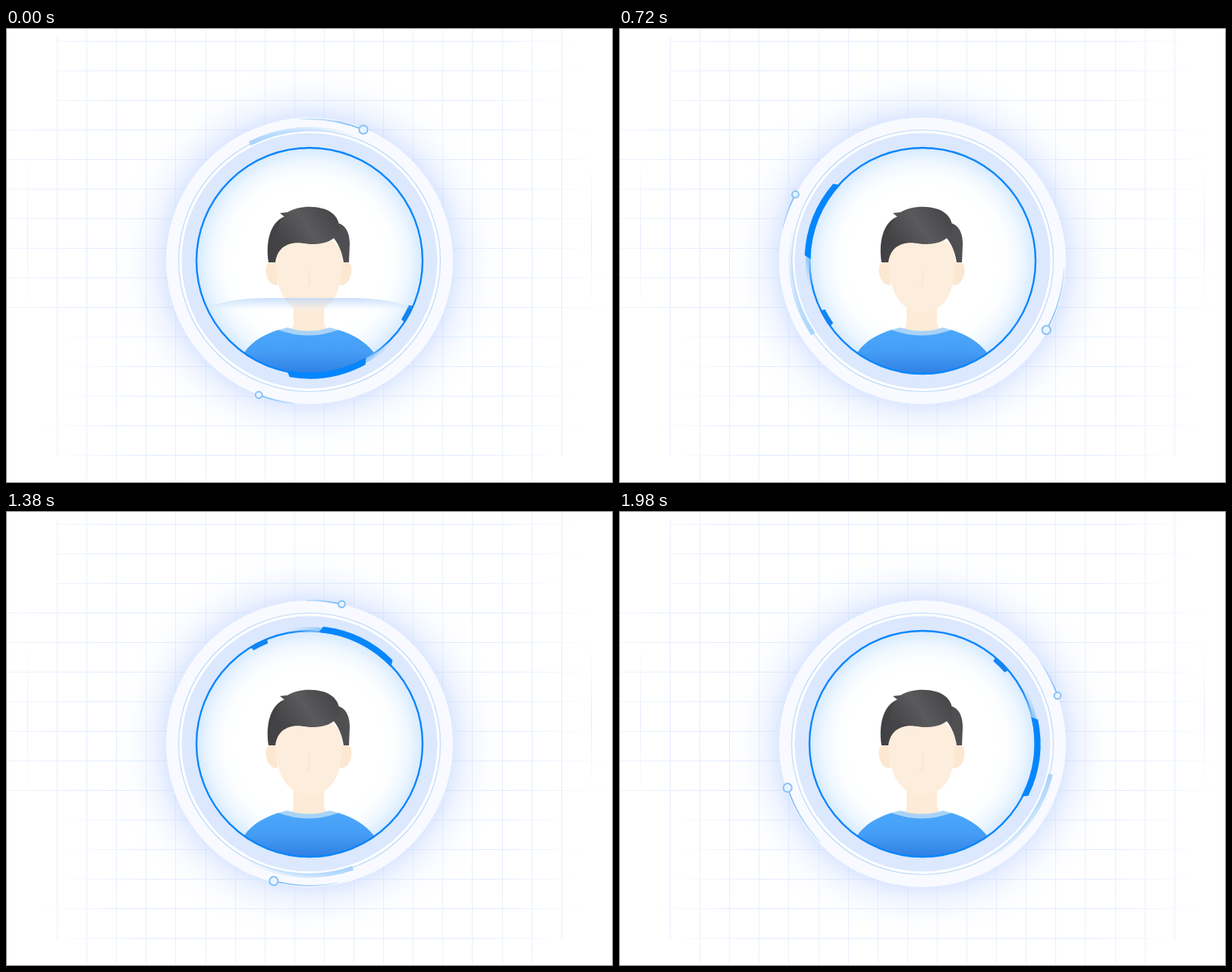
An HTML page with a canvas for the animation above (2040 ms loop, 800 by 600 pixels).

```html
<!DOCTYPE html>
<html lang="en">
<head>
<meta charset="utf-8">
<title>Face scan</title>
<style>
html, body { margin: 0; width: 100%; height: 100%; overflow: hidden; background: #fff }
canvas { display: block }
</style>
</head>
<body>
<canvas id="stage" width="800" height="600"></canvas>
<script>
const ctx = document.getElementById('stage').getContext('2d');
const CX = 400, CY = 307, LOOP = 2040, STEP = 60;
const rad = deg => deg * Math.PI / 180;
const clamp = v => Math.max(0, Math.min(1, v));

function fade(make, ...colors) {
  colors.forEach((c, i) => make.addColorStop(i / (colors.length - 1), c));
  return make;
}

const linear = (x0, y0, x1, y1, ...colors) => fade(ctx.createLinearGradient(x0, y0, x1, y1), ...colors);

const radial = (r0, r1, ...colors) => fade(ctx.createRadialGradient(CX, CY, r0, CX, CY, r1), ...colors);

// Gradient running along the angle from a0 to a1
function sweep(a0, a1, from, to) {
  const g = ctx.createConicGradient(rad(a0), CX, CY);
  g.addColorStop(0, from);
  g.addColorStop((a1 - a0) / 360, to);
  return g;
}

function disc(r, fill, x = CX, y = CY) {
  ctx.beginPath();
  ctx.arc(x, y, r, 0, 7);
  ctx.fillStyle = fill;
  ctx.fill();
}

function arc(r, width, color, a0 = 0, a1 = 360) {
  ctx.beginPath();
  ctx.arc(CX, CY, r, rad(a0), rad(a1));
  ctx.lineWidth = width;
  ctx.strokeStyle = color;
  ctx.stroke();
}

// Ring segment whose outer edge is shorter than the inner one by slant at each end
function wedge(r0, r1, a0, a1, slant, fill) {
  ctx.beginPath();
  ctx.arc(CX, CY, r1, rad(a0 + slant), rad(a1 - slant));
  ctx.arc(CX, CY, r0, rad(a1), rad(a0), true);
  ctx.fillStyle = fill;
  ctx.fill();
}

function shape(d, fill) {
  ctx.fillStyle = fill;
  ctx.fill(new Path2D(d));
}

function clipped(r, draw) {
  ctx.save();
  ctx.beginPath();
  ctx.arc(CX, CY, r, 0, 7);
  ctx.clip();
  draw();
  ctx.restore();
}

function background() {
  ctx.fillStyle = '#fff';
  ctx.fillRect(0, 0, 800, 600);
  const clear = 'rgba(226,236,253,0)', line = '#e3ecfd';
  const starts = [67, 67, 67, 0, 0, 0, 0, 0, 0, 0, 67, 67, 67, 40, 67];
  const ends = [757, 765, 733, 785, 785, 785, 785, 785, 800, 800, 748, 770, 760, 772, 733];
  starts.forEach((x, i) => {
    ctx.fillStyle = linear(x, 0, ends[i], 0, i < 10 ? '#eef3fe' : clear, line, line, line, line, line, clear);
    ctx.fillRect(x, Math.round(17 + i * 39), ends[i] - x, 1);
  });
  for (let i = -1; i < 19; i++) {
    const edge = i < 0 || i > 17;
    const top = edge ? 170 : i ? 0 : 10;
    const bottom = edge ? 375 : i && i < 17 ? 600 : 565;
    ctx.fillStyle = linear(0, top, 0, bottom, edge ? clear : '#eaf1fe', line, edge ? clear : '#eaf1fe');
    ctx.fillRect(Math.round(67 + i * 39.1), top, 1, bottom - top);
  }
  disc(265, radial(180, 265, 'rgba(186,208,255,.62)', 'rgba(206,222,255,.3)', 'rgba(228,237,255,.1)', 'rgba(255,255,255,0)'));
  ctx.strokeStyle = '#858585';
  ctx.lineWidth = 1;
  ctx.strokeRect(.5, .5, 799, 599);
}

function rings() {
  disc(189, '#f8faff');
  arc(172.5, 1.2, '#bfdcf9');
  disc(171, '#fff');
  disc(168.5, '#dce8fe');
  disc(149, radial(95, 149, '#fff', '#fcfeff', '#eff7ff', '#d6eafe'));
}

function person() {
  const skin = '#fdeddc';
  shape('M379 360H419V388C420 396 425 398 430 400Q399 412 368 400C374 398 380 396 379 388Z', '#fdebd7');
  clipped(149, () => {
    shape('M314 428C325 412 341 404 359 398Q399 409 438 398C458 404 474 414 485 428L480 470H318Z',
      linear(0, 398, 0, 456, '#4ba8fb', '#459df5', '#2f80e3'));
  });
  shape('M359 398L371 395Q399 404 427 395L438 398Q399 413 359 398Z', '#a9d3f6');
  shape('M356 309C344 305 341 315 343 324C345 334 350 340 358 339ZM442 309C454 305 457 315 455 324C453 334 448 340 440 339Z', '#fce7d0');
  shape('M355 300C358 280 375 275 400 275C425 275 441 282 443 303C444 340 434 374 399 375C366 374 354 338 355 300Z', skin);
  ctx.strokeStyle = '#f7dfc6';
  ctx.lineWidth = 1;
  ctx.stroke(new Path2D('M400 320V338Q400 343 395 342'));
  shape('M346 309C342 282 348 257 366 249L440 258C449 262 453 272 453 285L452 309H445C443 296 439 286 432 277L395 284C373 281 358 288 355 309Z',
    linear(345, 0, 453, 0, '#414143', '#4c4c4e', '#505052'));
  shape('M361 244L371 243C384 235 403 234 417 238C433 242 441 254 439 267C434 281 417 286 400 285C382 283 370 277 357 276C357 264 359 255 367 249Z',
    linear(430, 240, 365, 285, '#464648', '#5a5a5c', '#454547'));
}

// Dot on the outer rim pulling a fading line behind it
function orbiter(angle, r, tail, size) {
  arc(r, 1.8, sweep(angle - tail, angle, 'rgba(120,188,248,.25)', '#72b8f8'), angle - tail, angle);
  const x = CX + r * Math.cos(rad(angle)), y = CY + r * Math.sin(rad(angle));
  disc(size, '#eaf3ff', x, y);
  ctx.beginPath();
  ctx.arc(x, y, size, 0, 7);
  ctx.lineWidth = 2;
  ctx.strokeStyle = '#86c1f8';
  ctx.stroke();
}

function scanBeam(t) {
  if (t > 510) return;
  const y = 356 + .193 * t;
  const half = Math.sqrt(Math.max(0, 148 ** 2 - (y - CY) ** 2));
  const at = k => CX + half * k;
  clipped(148, () => {
    ctx.beginPath();
    ctx.moveTo(at(-1), y + 14);
    ctx.quadraticCurveTo(at(-.75), y, at(-.4), y);
    ctx.lineTo(at(.4), y);
    ctx.quadraticCurveTo(at(.75), y, at(1), y + 14);
    ctx.quadraticCurveTo(CX, y + 20, at(-1), y + 14);
    ctx.fillStyle = linear(0, y - 1, 0, y + 17, 'rgba(160,198,250,.6)', 'rgba(185,214,252,.35)', 'rgba(215,232,255,0)');
    ctx.fill();
  });
}

function brackets(t) {
  const alpha = clamp((t - 1410) / 90) * clamp((1890 - t) / 90);
  if (!alpha) return;
  ctx.save();
  ctx.globalAlpha = alpha;
  ctx.translate(399.5, 300.5);
  for (let i = 0; i < 4; i++) {
    ctx.rotate(Math.PI / 2);
    ctx.fillStyle = '#62b5f9';
    ctx.fillRect(-83, -83, 22, 4.5);
    ctx.fillRect(-83, -83, 4.5, 22);
    ctx.fillStyle = '#b0d8fc';
    ctx.fillRect(-59, -82, 35, 2);
    ctx.fillRect(23, -82, 35, 2);
  }
  ctx.restore();
}

function draw(t) {
  const slow = .1452 * t - 1.475e-5 * t * t;
  const fast = .1815 * t - 1.86e-5 * t * t;
  background();
  rings();

  const back = 243 - slow;
  wedge(170.5, 176.5, back, back + 46, 0, sweep(back, back + 46, '#a8d4fc', 'rgba(190,222,253,.1)'));
  orbiter(slow - 67.7, 187, 26, 5.6);
  orbiter(slow + 110.7, 189, 14.5, 4.4);

  person();
  arc(149, 2.4, '#0a86fb');

  const lead = 101.7 + fast, rear = lead - 42;
  wedge(148, 154, rear - 15, rear + 2, 0, sweep(rear - 15, rear, 'rgba(170,210,250,0)', 'rgba(150,200,247,.9)'));
  wedge(147.5, 155.5, rear, lead, 2, '#0586fd');
  const chip = 28.3 + fast;
  wedge(143.5, 150, chip - 4.2, chip + 4.2, -.5, '#1285f2');

  scanBeam(t);
  brackets(t);
}

const start = performance.now();
function tick() {
  const t = (performance.now() - start) % LOOP;
  draw(Math.floor(t / STEP) * STEP);
  requestAnimationFrame(tick);
}
tick();
</script>
</body>
</html>
```
